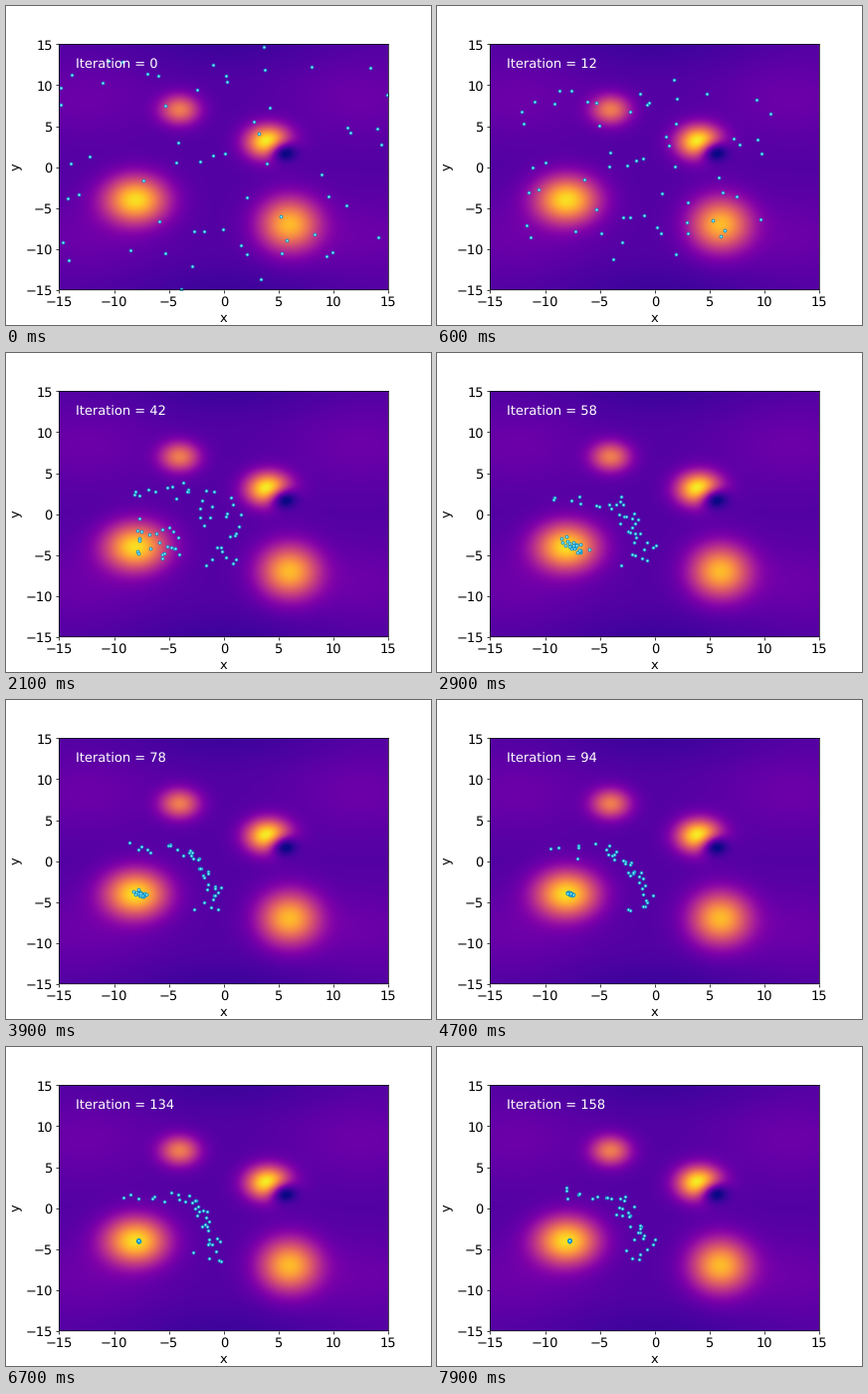
Recreate the animation shown at these times as a matplotlib script. Size 427 px wide and 320 px high, loop 8 s.

```python
import matplotlib.pyplot as plt
import numpy as np
from matplotlib.animation import FuncAnimation

WIDTH, HEIGHT, DPI = 427, 320, 200 / 3
FRAMES, INTERVAL = 80, 100
GATHERED_AT, SETTLED_AT = 13, 29
COUNT, CLUSTERED = 60, 23
PEAK = np.array([-7.8, -4.0])
CENTER = np.array([-2.0, -0.7])

# Key points of the curve on which the unconverged particles line up.
ARC_T = [0, 0.18, 0.3, 0.6, 0.85, 0.95, 1]
ARC_X = [-8.9, -4.6, -3.0, -1.8, -0.8, -1.2, -2.9]
ARC_Y = [1.7, 1.6, 0.8, -1.8, -4.5, -5.9, -5.5]

rng = np.random.default_rng(7)
start = rng.uniform(-15, 15, (COUNT, 2))
gathered = CENTER + 0.43 * start

# The particles nearest the peak converge on it; the others keep their
# angular order along the arc.
by_distance = np.argsort(np.hypot(*(gathered - PEAK).T))
cluster, arc = by_distance[:CLUSTERED], by_distance[CLUSTERED:]
angle = np.arctan2(*(gathered[arc] - PEAK).T[::-1])
arc = arc[np.argsort(-angle)]

t = np.linspace(0, 1, len(arc))
settled = np.empty_like(start)
settled[arc] = np.column_stack([np.interp(t, ARC_T, ARC_X),
                                np.interp(t, ARC_T, ARC_Y)])
along, across = rng.normal(size=(2, CLUSTERED, 1))
spread = [0.6, 0.05] + along * [0.55, -0.35] + across * [0.2, 0.25]
settled[cluster] = PEAK + spread

jitter = rng.normal(0, 0.45, (FRAMES, COUNT, 2))
jitter[:, cluster] *= 0.3


def blend(a, b, u):
    return a + (b - a) * np.clip(u, 0, 1)


def swarm(frame):
    pose = blend(start, gathered, frame / GATHERED_AT)
    approach = (frame - GATHERED_AT) / (SETTLED_AT - GATHERED_AT)
    pose = blend(pose, settled, approach)
    decay = np.exp(-max(0, frame - SETTLED_AT) / 12)
    noise = jitter[frame] * min(1, frame / GATHERED_AT)
    noise[cluster] *= decay
    if frame > SETTLED_AT:
        pose[cluster] = PEAK + spread * decay
    return pose + noise


def bump(x, y, cx, cy, sx, sy):
    return np.exp(-((x - cx) / sx) ** 2 / 2 - ((y - cy) / sy) ** 2 / 2)


def landscape(x, y):
    ax, ay = np.abs(x), np.abs(y)
    return (0.145
            + 0.06 * bump(ax, ay, 12.5, 8.4, 4.3, 3.2)
            - 0.05 * bump(x, ay, 0, 15, 6.5, 2.1)
            + 0.78 * bump(x, y, -8, -4, 2.0, 2.0)
            + 0.69 * bump(x, y, 6, -7, 1.9, 2.25)
            + 0.53 * bump(x, y, -4, 7, 1.25, 1.25)
            + 0.90 * bump(x, y, 4.1, 3.05, 1.4, 1.4)
            - 0.53 * bump(x, y, 5.3, 2.0, 0.9, 0.9))


plt.rcParams.update({"font.family": "DejaVu Sans", "font.size": 14,
                     "text.hinting": "none", "path.snap": False})
fig = plt.figure(figsize=((WIDTH + 0.01) / DPI, (HEIGHT + 0.01) / DPI), dpi=DPI)
ax = fig.add_axes([0.125, 0.11, 0.775, 0.77])

grid = np.linspace(-15, 15, 361)
ax.imshow(landscape(*np.meshgrid(grid, grid)), cmap="plasma", vmin=0, vmax=1,
          extent=(-15, 15, -15, 15), origin="lower", aspect="auto",
          interpolation="bilinear")
ax.set(xlim=(-15, 15), ylim=(-15, 15), xlabel="x", ylabel="y",
       xticks=range(-15, 16, 5), yticks=range(-15, 16, 5))
dots = ax.scatter(*start.T, s=9, facecolor="#a0ffff",
                  edgecolor="#1090c8", linewidth=1)
label = ax.text(0.05, 0.9, "", color="white", transform=ax.transAxes)


def update(frame):
    dots.set_offsets(swarm(frame))
    label.set_text(f"Iteration = {2 * frame}")
    return dots, label


animation = FuncAnimation(fig, update, frames=FRAMES, interval=INTERVAL,
                          repeat=True, repeat_delay=0)
plt.show()
```
